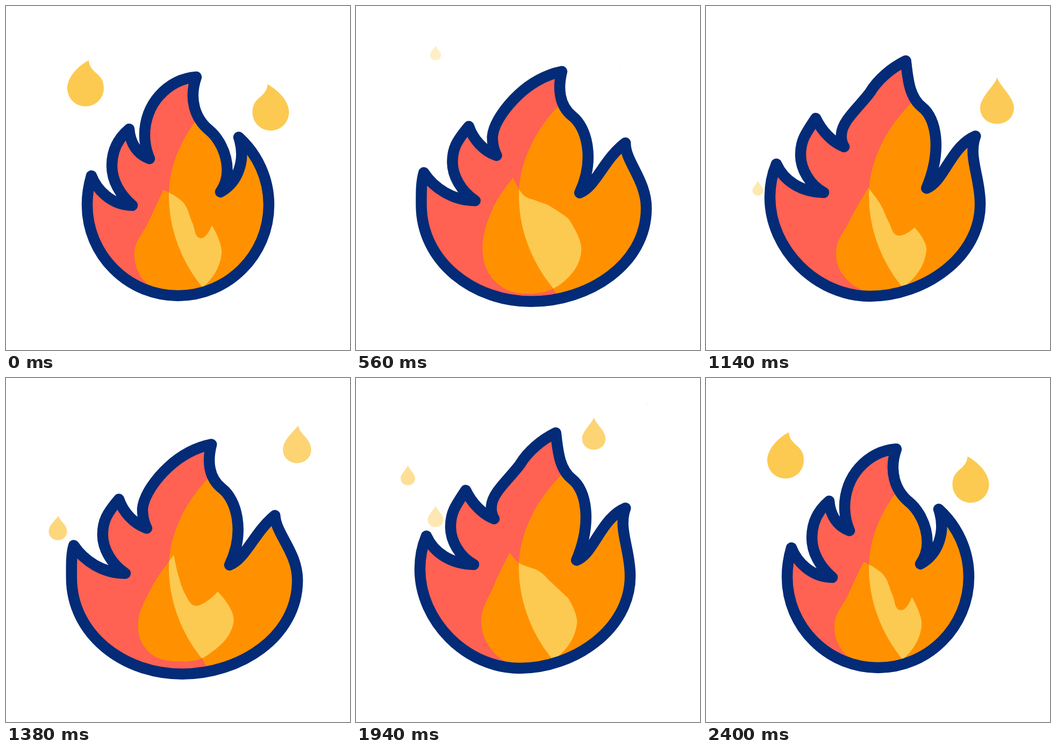
Recreate the animation shown at these times as an HTML page. Size 640 by 640 pixels, loop 2420 ms.

```html
<!DOCTYPE html>
<html lang="en">
<head>
<meta charset="utf-8">
<title>Flame</title>
<style>
  html, body { margin: 0; width: 100%; height: 100%; overflow: hidden; background: #fff; }
  svg { display: block; width: 100%; height: 100%; }
  .red { fill: #ff6152; }
  .orange { fill: #ff9100; }
  .yellow { fill: #fcca51; }
  .line { fill: none; stroke: #032b77; stroke-width: 20.5; stroke-linejoin: round; }
</style>
</head>
<body>
<svg viewBox="0 0 640 640">
  <defs>
    <clipPath id="body"><path class="flame"/></clipPath>
    <clipPath id="half">
      <path d="M410,155C340,212 303,285 303,352C303,420 330,480 366,524L385,560H640V100H410Z"/>
    </clipPath>
  </defs>
  <g id="drops" class="yellow"></g>
  <g clip-path="url(#body)">
    <rect class="red" width="640" height="640"/>
    <path class="core orange"/>
    <g clip-path="url(#half)">
      <rect class="orange" width="640" height="640"/>
      <path class="core yellow"/>
    </g>
  </g>
  <path class="flame line"/>
</svg>
<script>
const LOOP = 2420, CYCLE = 2400, BEAT = 800;

const mix = (a, b, k) => a.map((v, i) => v + (b[i] - v) * k);
const ease = k => k * k * (3 - 2 * k);
const nums = s => s.match(/-?[\d.]+/g).map(Number);

// Writes numbers back into the commands of a path.
const fill = (shape, list) => {
  let i = 0;
  return shape.replace(/-?[\d.]+/g, () => list[i++].toFixed(2));
};

// Eased value at time t from keys of [time, numbers].
function tween(keys, t) {
  let i = 1;
  while (i < keys.length - 1 && t > keys[i][0]) i++;
  const [t0, a] = keys[i - 1], [t1, b] = keys[i];
  return mix(a, b, ease((t - t0) / (t1 - t0)));
}

// Outer flame
const rest = `M159,316 C168,340 195,371 235,371
  C212,351 197,325 197,297 S209,246 229,229
  C231,256 245,276 267,284
  C261,270 258,256 258,240 C258,212 268,186 285,167 C303,147 327,134 354,132
  C340,172 351,209 378,231 S426,308 399,346
  C432,328 447,286 433,244
  C468,276 489,321 489,370 C489,463 413,539 320,539 S151,463 151,370
  C151,351 154,333 159,316Z`;
const upright = nums(`M134,296 C148,325 176,348 219,348
  C195,335 179,305 179,279 S184,242 198,213
  C212,233 231,253 257,263
  C252,256 251,249 252,240 C255,218 285,196 302,170 C311,148 323,128 344,103
  C356,128 362,157 390,174 S437,262 401,332
  C432,315 460,272 487,240
  C488,280 505,312 505,358 C505,462 409,542 308,542 S122,455 122,362
  C122,340 126,316 134,296Z`);
const curled = nums(`M131,294 C145,325 176,346 219,347
  C193,333 176,303 176,277 S184,239 204,209
  C215,232 234,253 257,262
  C252,254 251,247 252,238 C254,213 284,189 305,161 C319,137 345,115 371,102
  C375,130 376,168 402,188 S440,268 410,339
  C443,326 455,262 501,242
  C487,280 510,318 510,368 C510,468 405,540 305,540 S119,452 119,356
  C119,335 123,313 131,294Z`);
const spread = nums(`M126,312 C145,340 180,364 222,364
  C196,346 180,318 180,292 S188,252 210,226
  C218,250 238,272 262,280
  C256,268 254,256 254,244 C256,218 280,186 302,166 C324,146 352,130 382,124
  C374,154 376,186 402,206 S446,286 416,348
  C446,336 462,288 500,256
  C502,290 543,324 543,376 C543,482 436,551 328,551 S122,478 122,372
  C122,350 121,330 126,312Z`);
const home = nums(rest);
const flameKeys = [
  [0, home],
  [200, mix(upright, curled, -1.76)],
  [400, mix(upright, curled, 1.76)],
  [600, spread],
  [BEAT, home]
];

// Inner flame: tip, three points to the notch, spike, then round to the left side
const coreKeys = [
  [0, '293,342 330,366 347,404 362,432 383,408 401,462 368,522 320,540 263,518 239,460 265,402'],
  [300, '303,320 315,360 340,377 362,395 397,391 424,455 385,513 325,530 268,515 240,462 256,385'],
  [800, '283,319 308,344 330,349 357,351 392,398 415,455 385,515 320,540 258,517 232,455 252,372'],
  [1140, '302,338 325,370 340,402 357,427 388,412 410,455 375,517 320,534 264,511 242,458 267,400'],
  [1600, '321,322 317,365 328,403 352,421 399,385 435,452 375,514 315,521 267,508 249,458 274,382'],
  [1940, '286,325 305,345 340,359 362,379 395,410 411,458 378,516 320,538 262,516 233,455 257,385']
].map(([t, s]) => [t, nums(s)]);
coreKeys.push([CYCLE, coreKeys[0][1]]);
const CORNERS = [0, 4];

// Closed smooth curve through points, sharp at the corners.
function spline(list) {
  const n = list.length / 2;
  const at = i => { const k = (i + n) % n; return [list[2 * k], list[2 * k + 1]]; };
  const handle = (i, side) => {
    const p = at(i);
    if (CORNERS.includes(i % n)) return p;
    const a = at(i - 1), b = at(i + 1), q = at(i + side);
    const len = Math.hypot(q[0] - p[0], q[1] - p[1]) * 0.37 * side;
    const span = Math.hypot(b[0] - a[0], b[1] - a[1]);
    return [p[0] + (b[0] - a[0]) / span * len, p[1] + (b[1] - a[1]) / span * len];
  };
  let d = 'M' + at(0);
  for (let i = 0; i < n; i++) d += `C${handle(i, 1)} ${handle(i + 1, -1)} ${at(i + 1)}`;
  return d + 'Z';
}

// Drops
const hooked = 'M6,-52C-8,-45 -34,-24 -34,0C-34,19 -19,34 0,34C19,34 34,19 34,0C34,-30 8,-26 6,-52Z';
const hook = nums(hooked);
const plain = nums('M0,-60C-5,-42 -34,-20 -34,2C-34,21 -19,34 0,34C19,34 34,21 34,2C34,-20 5,-42 0,-60Z');
const drops = [
  { x: 148, y: 153, speed: 290, drag: 322, peak: 0, half: 800, size: 1, flip: 1 },
  { x: 492.5, y: 198, speed: 301, drag: 260, peak: 0, half: 600, size: 1, flip: -1 },
  { x: 541.5, y: 173, speed: 392, drag: 273, peak: 1200, half: 800, size: 1, flip: 1 },
  { x: 442.5, y: 155, speed: 400, drag: 260, peak: 1800, half: 600, size: 0.84, flip: 1 },
  { x: 96.5, y: 240, speed: 298, drag: 208, peak: 1600, half: 800, size: 0.69, flip: 1 }
];
const layer = document.getElementById('drops');
for (const drop of drops) {
  drop.el = document.createElementNS('http://www.w3.org/2000/svg', 'path');
  layer.append(drop.el);
}

function drawDrop(drop, t, d) {
  const { x, y, speed, drag, peak, half, size, flip, el } = drop;
  const from = ((t - peak + CYCLE * 1.5) % CYCLE) - CYCLE / 2;
  const grow = Math.max(0, 1 - Math.abs(from) / half);
  const q = from / (2 * half);
  const s = grow * size;
  el.setAttribute('d', d);
  el.setAttribute('opacity', Math.min(1, grow * 1.04));
  el.setAttribute('transform',
    `translate(${x} ${y - speed * q + drag * q * q}) scale(${s * flip} ${s})`);
}

const setPath = (name, d) =>
  document.querySelectorAll(name).forEach(el => el.setAttribute('d', d));

function draw(now) {
  const t = Math.min(now % LOOP, CYCLE);
  const beat = t % BEAT;
  setPath('.flame', fill(rest, tween(flameKeys, beat)));
  setPath('.core', spline(tween(coreKeys, t)));
  const bend = (1 + Math.cos(beat / BEAT * 2 * Math.PI)) / 2;
  const d = fill(hooked, mix(plain, hook, bend));
  for (const drop of drops) drawDrop(drop, t, d);
}

const start = performance.now();
function tick() {
  draw(performance.now() - start);
  requestAnimationFrame(tick);
}
tick();
</script>
</body>
</html>
```
